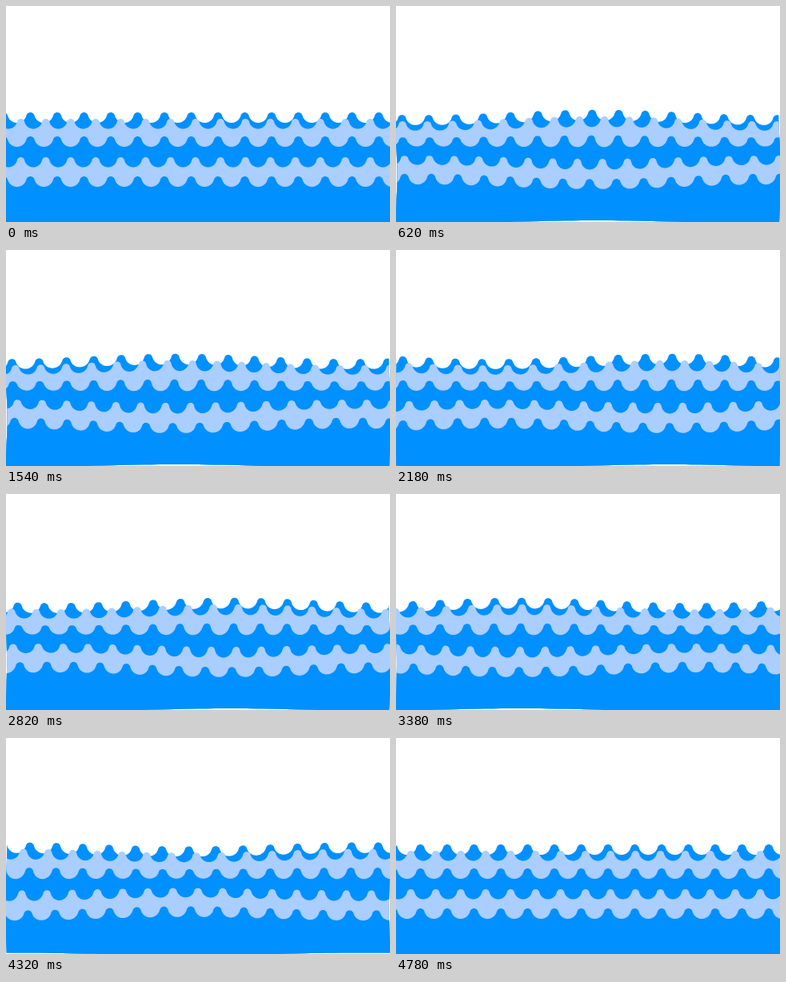
Recreate the animation shown at these times as an HTML page with a canvas. Size 480 by 270 pixels, loop 4.8 s.

```html
<!DOCTYPE html>
<html>
<head>
<meta charset="utf-8">
<style>
html, body { margin: 0; width: 100%; height: 100%; overflow: hidden; background: #fff; }
canvas { display: block; }
</style>
</head>
<body>
<canvas id="sea" width="480" height="270"></canvas>
<script>
const ctx = document.getElementById('sea').getContext('2d');
const W = 480, H = 270, LOOP = 4800;

const BLUE = { color: '#0090ff', period: 33.5, start: 30.5, height: 13 };
const LIGHT = { color: '#aaceff', period: 31.2, start: 18.5, height: 12.5 };
const WAVES = [[BLUE, 133], [LIGHT, 141], [BLUE, 163], [LIGHT, 189], [BLUE, 213]];

// Key points: time, drift of the blue and light waves, position of the swell
const KEYS = [
  [0, 0, 0, 260],
  [620, 12, -9, 250],
  [1540, 12, -5.3, 212],
  [2180, 11.6, -2.3, 340],
  [2820, 19, -10.5, 280],
  [3920, 28.8, -25.2, 40],
  [LOOP, BLUE.period, -LIGHT.period, 0],
];

const smooth = u => u * u * (3 - 2 * u);

// Smooth curve through the key points, at rest where the loop closes
function poseAt(t) {
  const i = KEYS.findLastIndex(key => key[0] <= t);
  const span = KEYS[i + 1][0] - KEYS[i][0], u = (t - KEYS[i][0]) / span, v = 1 - u;
  const slope = (k, n) => KEYS[k - 1] && KEYS[k + 1]
    ? (KEYS[k + 1][n] - KEYS[k - 1][n]) / (KEYS[k + 1][0] - KEYS[k - 1][0]) * span : 0;
  return KEYS[i].map((a, n) => a + (KEYS[i + 1][n] - a) * smooth(u)
    + u * v * (v * slope(i, n) - u * slope(i + 1, n)));
}

// Height below the crest: a narrow crest arc tangent to a wide trough arc
function profile({ period, height }, x) {
  const half = period / 2, radii = (half * half + height * height) / (2 * height);
  const crest = 0.3 * radii, trough = radii - crest;
  const d = Math.abs(x - Math.round(x / period) * period);
  return d < 0.3 * half
    ? crest - Math.sqrt(crest * crest - d * d)
    : height - trough + Math.sqrt(trough * trough - (half - d) ** 2);
}

function trace(points) {
  ctx.beginPath();
  points.forEach(([x, y]) => ctx.lineTo(x, y));
}

function draw(t) {
  const [, blueDrift, lightDrift, swellX] = poseAt(t);
  const swell = 3.3 * smooth(Math.min(1, t / 500, (LOOP - t) / 700));

  // One standing swell bends the whole sheet along a slanted direction
  const warp = (x, y) => {
    const push = swell * Math.cos((x - swellX) / 440 * 2 * Math.PI) * Math.cos((y - 133) / 80 * Math.PI);
    return [x + push / 2, y - push];
  };

  ctx.fillStyle = '#fff';
  ctx.fillRect(0, 0, W, H);
  ctx.save();

  // The bent sheet leaves white slivers at the sides and bottom
  const outline = [];
  for (let y = 110; y < H; y += 5) outline.push(warp(0, y));
  for (let x = 0; x <= W; x += 10) outline.push(warp(x, H));
  for (let y = H - 5; y >= 110; y -= 5) outline.push(warp(W, y));
  trace(outline);
  ctx.clip();

  for (const [wave, crestY] of WAVES) {
    const offset = wave.start + (wave === BLUE ? blueDrift : lightDrift);
    const points = [];
    for (let x = -10; x <= W + 10; x += 0.5) {
      points.push(warp(x, crestY + profile(wave, x - offset)));
    }
    trace([...points, [W + 10, H + 10], [-10, H + 10]]);
    ctx.fillStyle = wave.color;
    ctx.fill();
  }
  ctx.restore();
}

function frame() {
  draw(performance.now() % LOOP);
  requestAnimationFrame(frame);
}
frame();
</script>
</body>
</html>
```
